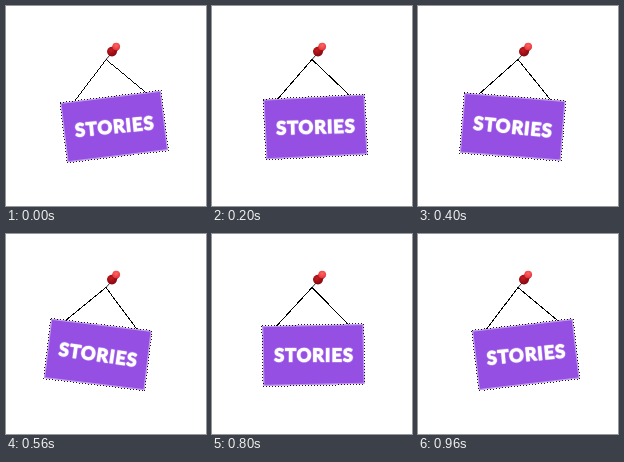
An HTML page for the animation above (1 s loop, 200 by 200 pixels).

```html
<!DOCTYPE html>
<html lang="en">
<head>
<meta charset="utf-8">
<title>Swinging sign</title>
<style>
  html, body { margin: 0; width: 100%; height: 100%; overflow: hidden; background: #fff; }
  svg { display: block; width: 100vw; height: 100vh; }
  .word {
    font: 700 18px Lato, sans-serif;
    letter-spacing: 1.1px;
    text-anchor: middle;
    fill: #fff;
    stroke: #fff;
    stroke-width: 1.1;
    stroke-linejoin: round;
  }
  .glow { stroke: #d3b0f7; stroke-width: 2.4; opacity: .45; }
  .line { fill: none; stroke: #000; shape-rendering: crispEdges; }
</style>
</head>
<body>
<svg viewBox="0 0 200 200">
  <defs>
    <radialGradient id="base" cx=".4" cy=".35" r=".7">
      <stop offset="0" stop-color="#c81a20"/>
      <stop offset="1" stop-color="#7e0610"/>
    </radialGradient>
    <radialGradient id="cap" cx=".5" cy=".35" r=".7">
      <stop offset="0" stop-color="#ff6663"/>
      <stop offset="1" stop-color="#e02f35"/>
    </radialGradient>
  </defs>
  <!-- origin of the sign is the nail point it hangs from -->
  <g id="sign">
    <path class="line" d="M-36.5 38.5L0 .5L36 38.5"/>
    <rect x="-50.5" y="38.2" width="101" height="59.6" fill="#954fe2"/>
    <rect x="-50" y="38.7" width="100" height="58.6" fill="none" stroke="#c9a6f2" stroke-width=".9"/>
    <rect class="line" x="-51" y="37.7" width="102" height="60.8" stroke-width=".9" stroke-dasharray="1 2"/>
    <g transform="translate(.5 74.5) rotate(1.3)">
      <text class="word glow">STORIES</text>
      <text class="word">STORIES</text>
    </g>
  </g>
  <path d="M104 49L100 53.5" stroke="#333" stroke-width="1"/>
  <path d="M104.5 43L108 38.5L113 43L109.5 47Z" fill="#a9141e"/>
  <ellipse cx="106" cy="45.6" rx="5" ry="4.8" fill="url(#base)"/>
  <ellipse cx="110.2" cy="40.5" rx="3.9" ry="3.8" fill="url(#cap)"/>
</svg>
<script>
  const LOOP = 1000, STEP = 40, TURN = 550, SWING = 6.9;
  const sign = document.getElementById('sign');
  const start = performance.now();

  // Eased swing one way until TURN, then a quicker one back.
  function angle(t) {
    const p = t < TURN ? t / TURN : 1 + (t - TURN) / (LOOP - TURN);
    return -SWING * Math.cos(Math.PI * p);
  }

  function draw(now) {
    const t = Math.floor((Math.max(0, now - start) % LOOP) / STEP) * STEP;
    sign.setAttribute('transform', `translate(100 53) rotate(${angle(t).toFixed(3)})`);
    requestAnimationFrame(draw);
  }
  draw(start);
</script>
</body>
</html>
```
